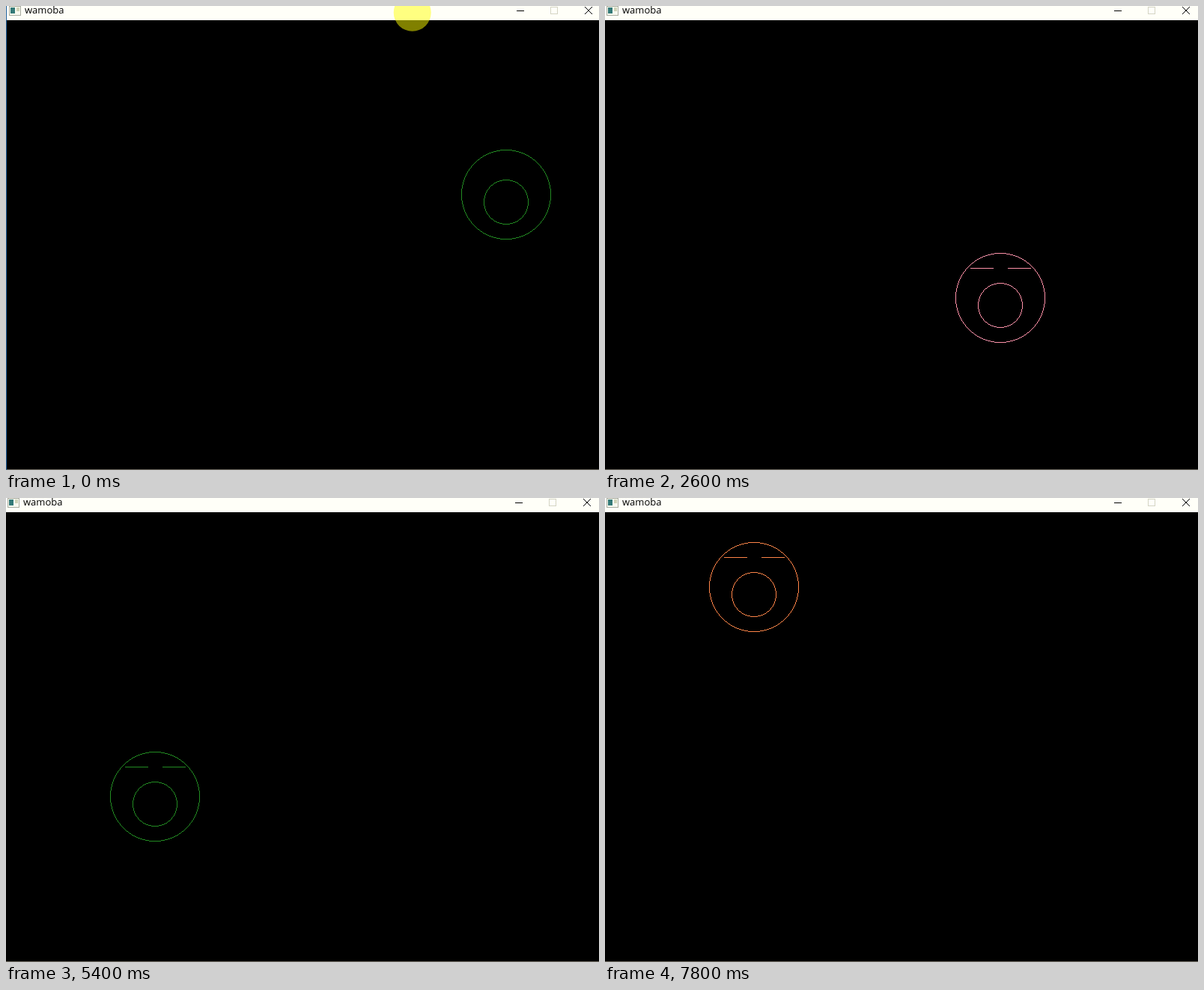
An HTML page with a canvas for the animation above (8000 ms loop, 792 px wide and 620 px high).

```html
<!DOCTYPE html>
<html lang="en">
<head>
<meta charset="utf-8">
<style>
  html, body { margin: 0; width: 100%; height: 100%; overflow: hidden; background: #000; }
  canvas { display: block; }
</style>
</head>
<body>
<canvas id="stage" width="792" height="620"></canvas>
<script>
const ctx = document.getElementById('stage').getContext('2d');
const LOOP = 8000, STEP = 200, BAR = 19;
const GREEN = '#228b22', PINK = '#ff91a8', ORANGE = '#ff8448';

// Path points: time, x, y, colour from that point on
const big = {
  head: 59.5, mouth: 29.5, eyeY: 40, eyeOut: 40, eyeIn: 10,
  path: [
    [0, 666, 252, GREEN], [300, 666, 252, GREEN], [860, 732, 186, PINK],
    [1400, 673, 245, PINK], [2600, 528, 390, PINK], [4040, 359, 559, GREEN],
    [5400, 199, 399, GREEN], [6590, 59, 259, ORANGE], [7000, 107, 211, ORANGE],
    [7800, 199, 119, ORANGE]
  ]
};
const small = {
  head: 29.5, mouth: 9.5, eyeY: 10, eyeOut: 25, eyeIn: 5,
  path: [
    [0, 428, 442, PINK], [1250, 575, 589, GREEN], [2840, 762, 402, PINK],
    [3600, 673, 313, PINK], [5850, 409, 49, PINK], [7800, 180, 278, PINK]
  ]
};
const pointer = [
  [0, 542, 8], [400, 542, 8], [1200, 544, 168], [1400, 544, 168], [2200, 520, 660]
];
const arrow = new Path2D('M0 0V16L4 12L7 18L9 17L6 11H11Z');

// What the flickering window shows per step: Big, Small, Circles only, Eyes only
const SHOWN = 'CBBSBBSEBSBBSBBBSSSBBBSBSBSBBSSSBBBBSBSB';

function along(path, t) {
  let i = 0;
  while (i < path.length - 2 && t >= path[i + 1][0]) i++;
  const [t0, x0, y0, color] = path[i], [t1, x1, y1, lastColor] = path[i + 1];
  const k = Math.min(1, (t - t0) / (t1 - t0));
  return {
    x: Math.round(x0 + (x1 - x0) * k),
    y: Math.round(y0 + (y1 - y0) * k),
    color: k < 1 ? color : lastColor
  };
}

function rect(color, x, y, w, h) {
  ctx.fillStyle = color;
  ctx.fillRect(x, y, w, h);
}

// One pixel wide circle without smoothing
function pixelCircle(color, cx, cy, r) {
  for (let a = 0.5; a <= r * Math.SQRT1_2 + 0.5; a++) {
    const b = Math.sqrt(r * r - a * a);
    for (const sx of [-1, 1]) for (const sy of [-1, 1]) {
      rect(color, Math.floor(cx + sx * a), Math.floor(cy + sy * b), 1, 1);
      rect(color, Math.floor(cx + sx * b), Math.floor(cy + sy * a), 1, 1);
    }
  }
}

// The window sits two pixels further right until it is let go
const windowX = t => t < 400 ? 2 : 0;

function drawFace(face, t, part) {
  const { x, y, color } = along(face.path, t);
  const cx = x + windowX(t);
  if (part !== 'E') {
    pixelCircle(color, cx, y, face.head);
    pixelCircle(color, cx, y + 10, face.mouth);
  }
  if (part !== 'C') {
    const w = face.eyeOut - face.eyeIn + 1;
    rect(color, cx - face.eyeOut, y - face.eyeY, w, 1);
    rect(color, cx + face.eyeIn, y - face.eyeY, w, 1);
  }
}

function drawPointer(t) {
  const { x, y } = along(pointer, t);
  ctx.save();
  ctx.beginPath();
  ctx.arc(x + 0.7, y + 0.7, 25, 0, Math.PI * 2);
  ctx.clip();
  rect('#ffff80', 0, 0, 792, BAR);
  rect('#808000', 0, BAR, 792, 620);
  ctx.restore();
  if (t < 600) return;
  ctx.save();
  ctx.translate(x + 0.5, y + 0.5);
  ctx.fillStyle = '#fff';
  ctx.strokeStyle = '#000';
  ctx.fill(arrow);
  ctx.stroke(arrow);
  ctx.restore();
}

function drawWindow(t) {
  rect('#000', 0, 0, 792, 620);
  rect('#fffff8', 0, 0, 792, BAR);
  rect('#6c6860', 0, 619, 792, 1);
  if (windowX(t)) rect('#20609c', 0, 0, 1, 620);
}

function drawTitle(t) {
  ctx.save();
  ctx.translate(windowX(t), 0);
  rect('#a9aca0', 2, -1, 16, 14);
  rect('#f8faf0', 3, 1, 14, 11);
  rect('#347a78', 4, 2, 6, 8);
  rect('#d0d4b8', 12, 2, 4, 5);
  ctx.fillStyle = '#000';
  ctx.font = '13px "Open Sans", "Noto Sans", sans-serif';
  ctx.fillText('wamoba', 23, 10);
  rect('#000', 680, 6, 10, 1);
  ctx.lineWidth = 1;
  ctx.strokeStyle = '#d4d4c4';
  ctx.strokeRect(725.5, 1.5, 9, 9);
  ctx.strokeStyle = '#000';
  ctx.beginPath();
  ctx.moveTo(771, 1); ctx.lineTo(781, 11);
  ctx.moveTo(781, 1); ctx.lineTo(771, 11);
  ctx.stroke();
  ctx.restore();
}

function draw(now) {
  const step = Math.floor((now % LOOP) / STEP), t = step * STEP;
  const part = SHOWN[step];
  drawWindow(t);
  drawFace(part === 'S' ? small : big, t, part);
  drawPointer(t);
  drawTitle(t);
}

const start = performance.now();
function tick() {
  draw(performance.now() - start);
  requestAnimationFrame(tick);
}
tick();
</script>
</body>
</html>
```
